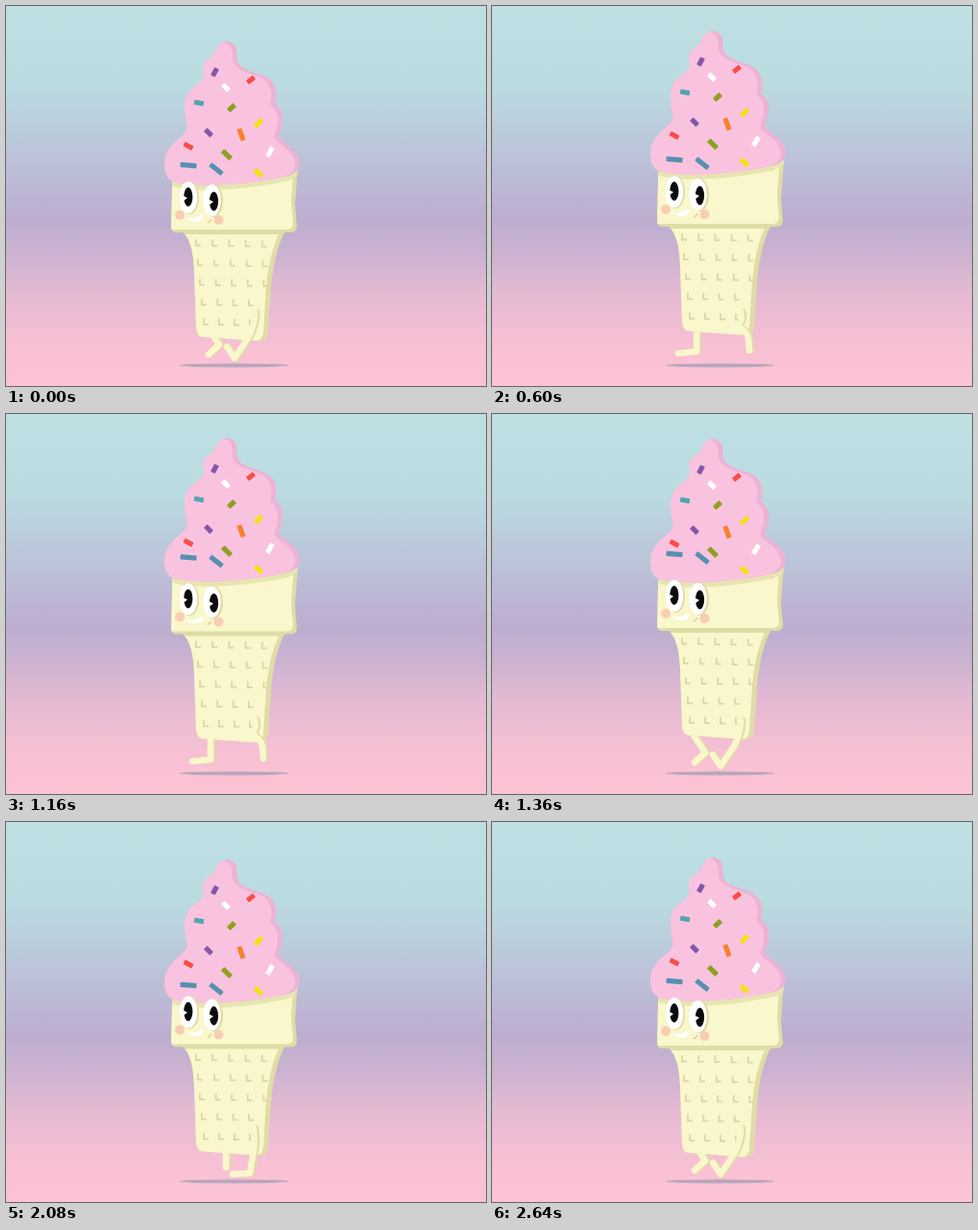
An HTML page for the animation above (2.68 s loop, 500 by 396 pixels).

```html
<!DOCTYPE html>
<html lang="en">
<head>
<meta charset="utf-8">
<title>Walking ice cream</title>
<style>
html, body { margin: 0; width: 100%; height: 100%; overflow: hidden; }
svg { display: block; width: 100vw; height: 100vh; }
.leg { fill: none; stroke-width: 6.5; stroke-linecap: round; stroke-linejoin: round; }
.light { fill: #f9f7cb; }
.shade { fill: #e0dca6; }
.leg .light, .leg .shade { fill: none; }
.leg .light { stroke: #f9f7cb; }
.leg .shade { stroke: #e0dca6; }
</style>
</head>
<body>
<svg viewBox="0 0 500 396" preserveAspectRatio="none">
  <defs>
    <linearGradient id="sky" x1="0" y1="0" x2="0" y2="1">
      <stop offset="0" stop-color="#bee0e3"/>
      <stop offset=".2" stop-color="#badce1"/>
      <stop offset=".38" stop-color="#bbc5da"/>
      <stop offset=".56" stop-color="#beadd0"/>
      <stop offset=".63" stop-color="#c7b1d0"/>
      <stop offset=".76" stop-color="#e5bad3"/>
      <stop offset=".9" stop-color="#f8c0d3"/>
      <stop offset="1" stop-color="#fcc3d3"/>
    </linearGradient>
    <path id="cream" d="M231 17C225 17 221 20 219 25C217 30 217 32 212 34C205 38 204 45 206 52C207 57 200 61 194 66C185 74 185 86 187 97C188 106 191 108 184 115C173 124 165 132 165 144C165 155 168 162 178 164C210 170 252 165 285 159C299 157 306 152 306 144C306 132 294 126 285 118C283 115 288 108 288 100C289 90 285 87 280 81C283 72 282 61 273 55C263 49 247 48 242 39C239 33 242 28 239 22C237 19 234 17 231 17Z"/>
    <path id="rim" d="M173 152L173 177L172 216Q172 222 178 222L297 222Q303 222 303 215L301 193L304 153Z"/>
    <path id="cone" d="M183 220C193 230 195 243 196 262L198 322Q199 331 206 331L262 335Q272 336 273 327L276 280Q279 243 291 220Z"/>
    <clipPath id="inCream"><use href="#cream"/></clipPath>
    <clipPath id="inRim"><use href="#rim"/></clipPath>
    <clipPath id="inCone"><use href="#cone"/></clipPath>
  </defs>

  <rect width="500" height="396" fill="url(#sky)"/>
  <ellipse cx="237.5" cy="374.5" rx="57" ry="2" fill="#b7a6bc"/>
  <g id="far" class="leg"><path class="shade" transform="translate(2 0)"/><path class="light"/></g>

  <g class="body">
    <use href="#cone" class="shade"/>
    <g clip-path="url(#inCone)"><use href="#cone" class="light" transform="translate(-5 0)"/></g>
    <path id="waffle" fill="none" stroke="#dbd7a8" stroke-width="1.8"/>
    <g clip-path="url(#inCone)"><rect x="180" y="220" width="115" height="4" class="shade"/></g>
  </g>
  <g id="near" class="leg"><path class="shade" transform="translate(2 0)"/><path class="light"/></g>
  <g class="body">
    <use href="#rim" class="shade"/>
    <g clip-path="url(#inRim)">
      <use href="#rim" class="light" transform="translate(-4 -3)"/>
      <use id="cast" href="#cream" fill="#e8e4b2"/>
    </g>
  </g>

  <g id="scoop">
    <use href="#cream" fill="#edb3d4"/>
    <g clip-path="url(#inCream)"><use href="#cream" fill="#f9c3df" transform="translate(-5 1)"/></g>
    <g id="bits"></g>
  </g>
  <g id="blues"></g>

  <g class="body">
    <ellipse cx="191.5" cy="186" rx="9.5" ry="17" class="shade"/>
    <ellipse cx="216.5" cy="189" rx="9.5" ry="17" class="shade"/>
    <g fill="#fff">
      <ellipse cx="190" cy="185.5" rx="9.3" ry="16.5"/>
      <ellipse cx="214.5" cy="188.5" rx="9.3" ry="16.5"/>
    </g>
    <g fill="#0b0b0b">
      <ellipse cx="189.8" cy="185" rx="4.6" ry="10"/>
      <ellipse cx="216.5" cy="189.5" rx="4.6" ry="10"/>
    </g>
    <path d="M185 184l4 2l-4 3zM212 188l4 2l-4 3z" fill="#fff"/>
    <g fill="#f9cdb4"><circle cx="181" cy="204" r="5"/><circle cx="221.5" cy="209" r="5"/></g>
    <path d="M187 206Q195 210 204 203Q207 205 204 209Q195 214 187 206Z" fill="#fff"/>
    <path d="M210 212Q213 211 214 208" fill="none" stroke="#d8d2a0" stroke-width="1.4"/>
  </g>
</svg>
<script>
const STEP = 40, FRAMES = 67, POSE_LEN = 4;
const $ = id => document.getElementById(id);

// vertical offsets as [frame, y]
const bodyKeys = [[0, 14], [8, 0], [15, 8], [18, 11], [24, 0], [30, 8], [34, 4], [41, 0], [43, 2], [52, 12.5], [57, 9], [66, 14]];
const scoopKeys = [[0, 20], [2, 22], [10, -2], [15, 9], [19, 14], [24, 5], [27, 3], [31, 13], [34, 9], [43, 0], [52, 22], [58, 15], [66, 20]];
const blueKeys = [[0, 20], [3, 23], [10, 2], [15, 14], [19, 18], [24, 10], [34, 0], [43, 0], [52, 24], [58, 17], [66, 20]];

// leg drawings, each held in turn
const poses = [
  { far: "M208 332L222 353L211 363", near: "M259 319Q260 331 252 346L238 367L230 355" },
  { far: "M229 336L229 360", near: "M258 319Q260 335 257 348L254 366L236 367" },
  { far: "M206 328Q204 343 193 360L185 349", near: "M261 319Q257 328 257 337L270 361L260 368" },
  { far: "M213 332L213 360L194 362", near: "M259 318Q262 326 256 334Q266 339 267 346L268 359" }
];

// smooth curve through the keys
function track(keys, x) {
  let i = 0;
  while (i < keys.length - 2 && x > keys[i + 1][0]) i++;
  const slope = k => {
    const a = keys[Math.max(k - 1, 0)], b = keys[Math.min(k + 1, keys.length - 1)], c = keys[k];
    if ((c[1] - a[1]) * (b[1] - c[1]) <= 0) return 0;
    return (b[1] - a[1]) / (b[0] - a[0]);
  };
  const [x0, y0] = keys[i], [x1, y1] = keys[i + 1], w = x1 - x0;
  const u = (x - x0) / w, v = 1 - u;
  return y0 * v * v * (1 + 2 * u) + y1 * u * u * (3 - 2 * u) + w * u * v * (slope(i) * v - slope(i + 1) * u);
}

const sprinkle = ([x, y, turn, len, color]) =>
  `<rect x="${-len / 2}" y="-2.6" width="${len}" height="5.2" rx=".8" fill="${color}" transform="translate(${x} ${y}) rotate(${turn})"/>`;

$("bits").innerHTML = [
  [217.5, 49, -62, 9, "#8457a8"], [229, 65, 45, 9, "#fff"], [255, 57, -38, 9, "#fa4d48"],
  [201, 81, 10, 10, "#52a5ae"], [235, 86, -42, 9, "#8fa021"], [263, 102, -45, 10, "#f3e112"],
  [211, 112, 45, 9, "#8457a8"], [245, 114, 70, 13, "#f9802d"], [190, 126, 28, 10, "#fa4d48"],
  [230, 135, 45, 12, "#8fa021"], [275, 132, -60, 11, "#fff"], [263, 154, 40, 10, "#f3e112"]
].map(sprinkle).join("");
$("blues").innerHTML = [[190, 146, 4, 17, "#5790b0"], [219, 150, 38, 16, "#5790b0"]].map(sprinkle).join("");

let ticks = "";
for (let r = 0; r < 5; r++)
  for (let c = 0; c < (r < 3 ? 5 : 4); c++)
    ticks += `M${198 + r * 2 + c * (17.2 - r * 0.3)} ${229 + r * 20.6 + c * 0.3}v6.5h5`;
$("waffle").setAttribute("d", ticks);

const bodies = document.querySelectorAll(".body");
const shift = (el, y) => el.setAttribute("transform", `translate(0 ${y.toFixed(2)})`);
const setLeg = (id, d) => { for (const p of $(id).children) p.setAttribute("d", d); };

function draw(ms) {
  const n = Math.floor(ms / STEP) % FRAMES;
  const body = track(bodyKeys, n), scoop = track(scoopKeys, n);
  bodies.forEach(el => shift(el, body));
  shift($("scoop"), scoop);
  shift($("blues"), track(blueKeys, n));
  shift($("cast"), scoop - body + 5);
  const pose = poses[Math.floor(n / POSE_LEN) % poses.length];
  setLeg("far", pose.far);
  setLeg("near", pose.near);
}

const start = performance.now();
function loop(now) {
  draw(Math.max(0, now - start));
  requestAnimationFrame(loop);
}
draw(0);
requestAnimationFrame(loop);
</script>
</body>
</html>
```
